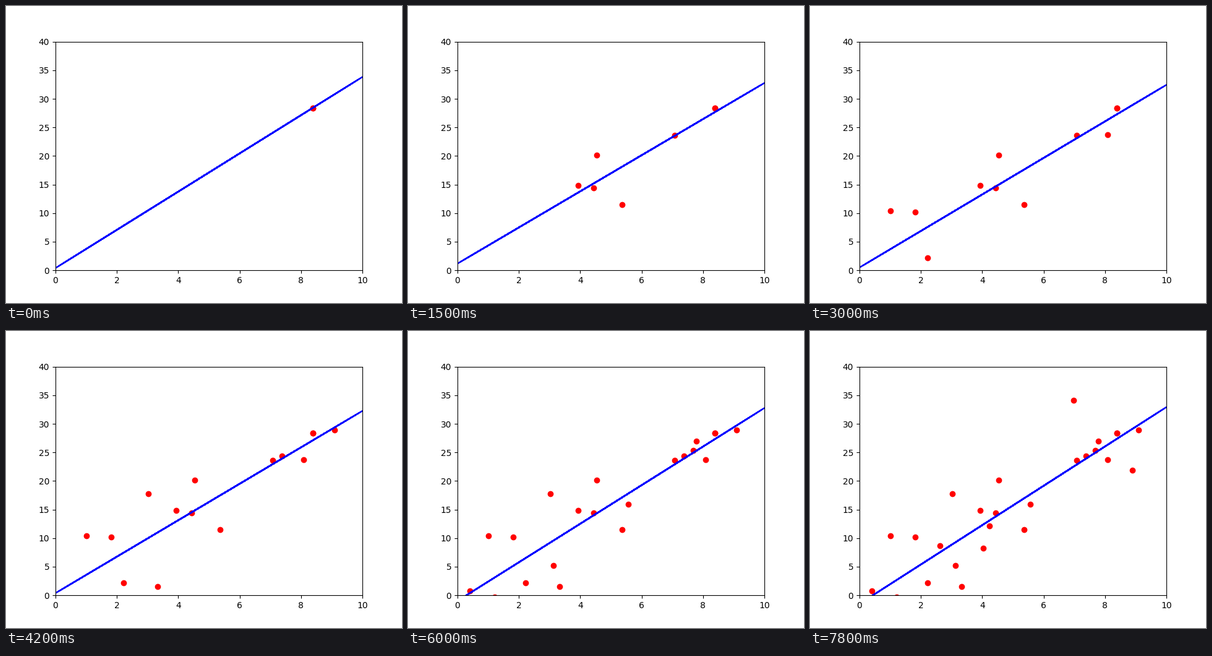
Recreate the animation shown at these times as a matplotlib script. Size 640x480 px, loop 8000 ms.

```python
import numpy as np
import matplotlib.pyplot as plt
from matplotlib.animation import FuncAnimation

FRAME_MS = 100
FRAMES = 80
FRAMES_PER_SAMPLE = 3

grid = np.linspace(0, 10, 100)
order = np.random.RandomState(42).permutation(grid.size)

# Observations in the order they arrive.
values = np.array([
    28.42, 11.46, 23.61, 20.15, 14.42, 14.85, 2.19, 23.72, 10.41,
    -5.40, 10.19, 17.77, 24.37, 1.54, 28.92, 0.78, 25.35, 26.97,
    -0.33, 5.22, 15.93, 21.88, 8.68, 12.14, 34.11, -1.00, 8.25,
])

# The first sample counts twice.
sample_x = np.r_[grid[order[0]], grid[order[:values.size]]]
sample_y = np.r_[values[0], values]
shuffled = grid[order]


def fit_line(x, y):
    """Least-squares intercept and slope (minimum norm for a single point)."""
    design = np.column_stack([np.ones_like(x), x])
    return np.linalg.lstsq(design, y, rcond=None)[0]


fig, ax = plt.subplots(figsize=(6.4, 4.8), dpi=100)
ax.set_xlim(0, 10)
ax.set_ylim(0, 40)
dots = ax.scatter([], [], color="red")
line, = ax.plot([], [], color="blue", lw=1.5)


def update(frame):
    count = frame // FRAMES_PER_SAMPLE + 2
    x, y = sample_x[:count], sample_y[:count]
    intercept, slope = fit_line(x, y)
    dots.set_offsets(np.column_stack([x, y]))
    line.set_data(shuffled, intercept + slope * shuffled)
    return dots, line


animation = FuncAnimation(fig, update, frames=FRAMES, interval=FRAME_MS,
                          repeat=True, repeat_delay=0)
plt.show()
```
